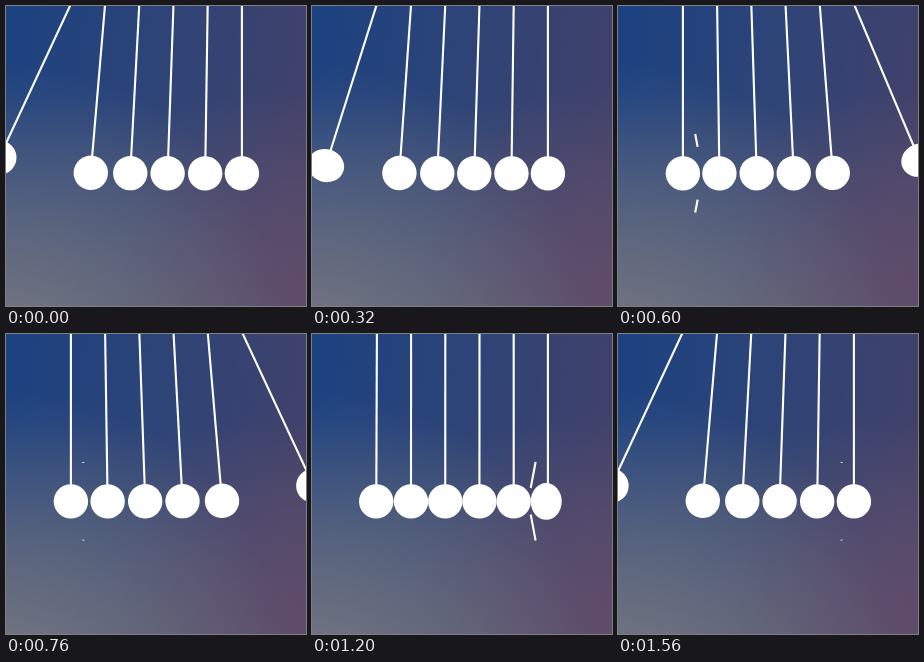
Animation of 300 by 300 pixels, one loop 1600 ms. Source, as an HTML page with a canvas:

```html
<!DOCTYPE html>
<html>
<head>
<meta charset="utf-8">
<style>
  html, body { margin: 0; width: 100%; height: 100%; overflow: hidden; }
  body {
    background:
      radial-gradient(circle at 0 112%, rgba(128, 126, 132, .75), rgba(110, 114, 130, 0) 62%),
      radial-gradient(circle at 98% 92%, rgba(104, 68, 100, .6), rgba(95, 68, 100, 0) 50%),
      linear-gradient(rgba(90, 97, 118, 0) 30%, rgba(90, 97, 118, .75)),
      linear-gradient(97deg, #1c4281, #2c4478 45%, #434169);
  }
  canvas { display: block; width: 100vw; height: 100vh; }
</style>
</head>
<body>
<canvas id="stage" width="300" height="300"></canvas>
<script>
const ctx = document.getElementById('stage').getContext('2d');
const PERIOD = 1600, HALF = 800, SWING = 400;
const CENTER = 150.4, SPACING = 34.2, PIVOT_Y = -2, LENGTH = 169.4, RADIUS = 17.2;

// Indexed by rank: 0 is the swinging ball, 5 the one that was just hit from outside.
const MAX_ANGLE = [25, 4.85, 3.05, 2, 0.85, 0];
const FALL_POWER = [5.5, 7.7, 10, 10, 10, 1];

function line(x1, y1, x2, y2) {
  ctx.beginPath();
  ctx.moveTo(x1, y1);
  ctx.lineTo(x2, y2);
  ctx.stroke();
}

function stretchOf(rank, rising, u) {
  if (rank === 0) {
    return rising ? 1 + 0.2 * (5 * u * Math.exp(1 - 5 * u)) ** 1.5
                  : 1 + 0.16 * u ** 3.5;
  }
  if (rank === 5 && rising) return 1 - 0.1 * Math.max(0, 1 - u * 5);
  return 1;
}

function drawBall(rank, side, rising, u) {
  const amount = rising ? 1 - (1 - u) ** 3.5 : 1 - u ** FALL_POWER[rank];
  const angle = -side * MAX_ANGLE[rank] * amount * Math.PI / 180;
  const stretch = stretchOf(rank, rising, u);
  const shift = rank === 5 ? side * RADIUS * (1 - stretch) : 0;
  ctx.save();
  ctx.translate(CENTER + side * (2.5 - rank) * SPACING, PIVOT_Y);
  ctx.rotate(angle);
  line(0, 0, 0, LENGTH);
  ctx.beginPath();
  ctx.ellipse(shift, LENGTH, RADIUS * stretch, RADIUS * stretch ** -0.65, 0, 0, 2 * Math.PI);
  ctx.fill();
  ctx.restore();
}

function drawSparks(side, u) {
  const left = 1 - u * u * (3 - 2 * u);
  const outer = CENTER - side * 73.2;
  const inner = outer + side * 4.9 * left;
  line(outer, 128, inner, 128 + 26 * left);
  line(outer, 206.5, inner, 206.5 - 26 * left);
}

function draw(now) {
  const t = now % PERIOD;
  const side = t >= SWING && t < SWING + HALF ? 1 : -1;
  const sinceHit = (t + SWING) % HALF;
  const rising = sinceHit < SWING;
  const u = (sinceHit % SWING) / SWING;

  ctx.clearRect(0, 0, 300, 300);
  ctx.fillStyle = ctx.strokeStyle = '#fff';
  ctx.lineWidth = 2.1;
  for (let rank = 0; rank < 6; rank++) drawBall(rank, side, rising, u);
  if (rising) drawSparks(side, u);
}

const start = performance.now();
function tick() {
  draw(performance.now() - start);
  requestAnimationFrame(tick);
}
tick();
</script>
</body>
</html>
```
